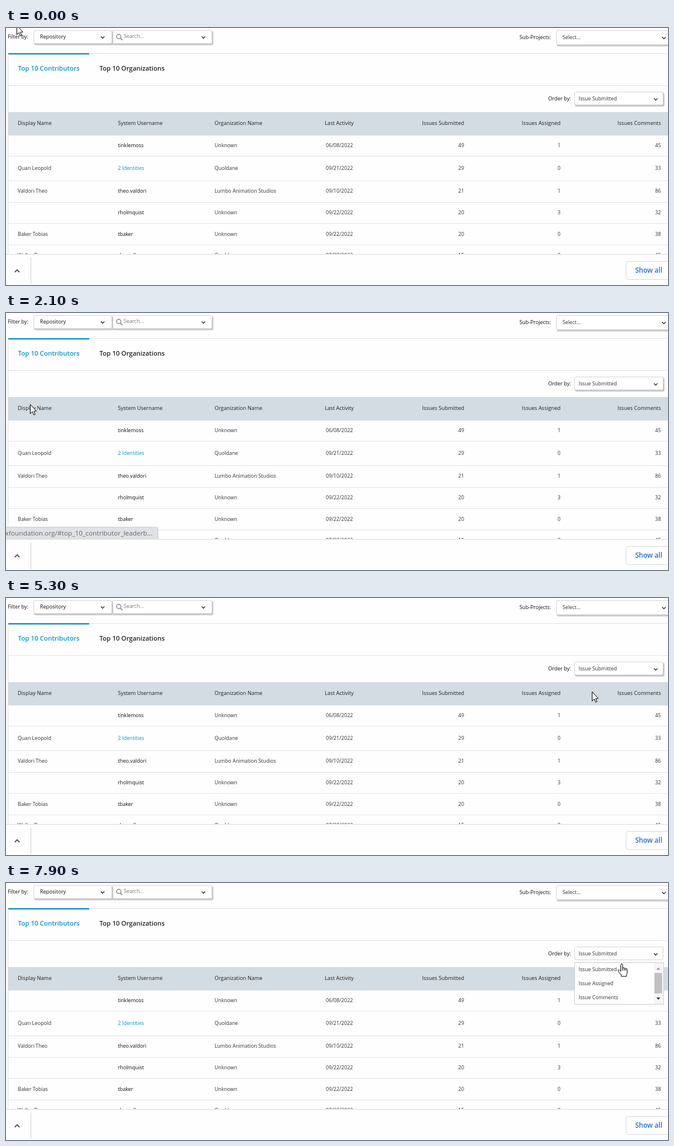
These frames come from a looping animation (1130x440 px, 8 s). An HTML page:

```html
<!DOCTYPE html>
<html lang="en">
<head>
<meta charset="utf-8">
<title>Leaderboard</title>
<style>
html, body { margin: 0; width: 100%; height: 100%; overflow: hidden; background: #fefefe; }
svg { display: block; width: 1130px; height: 440px; }
text { font-family: "Open Sans", "Noto Sans", sans-serif; font-size: 8.7px; fill: #333; white-space: pre; }
.label { font-size: 8.9px; fill: #111; }
.head { font-size: 9px; fill: #222; }
.user { fill: #111; }
.link { fill: #0e93c4; }
.hint { fill: #777; }
.tab { font-size: 11px; font-weight: 600; fill: #222; }
.on { fill: #0e93c4; }
.all { font-size: 11.6px; font-weight: 600; fill: #2a6bc9; }
.status { font-size: 11.3px; fill: #666a6e; }
.chev { fill: none; stroke: #333; stroke-width: 1.4; }
.cursor { fill: #fff; stroke: #000; stroke-width: 1; stroke-linejoin: round; }
</style>
</head>
<body>
<svg id="stage" viewBox="0 0 1130 440"></svg>
<script>
const NS = "http://www.w3.org/2000/svg";
const stage = document.getElementById("stage");

function add(tag, attrs, parent = stage) {
  const el = document.createElementNS(NS, tag);
  for (const k in attrs) el.setAttribute(k, attrs[k]);
  parent.appendChild(el);
  return el;
}
const rect = (x, y, width, height, fill, more = {}, parent) =>
  add("rect", { x, y, width, height, fill, ...more }, parent);
const path = (d, more, parent) => add("path", { d, ...more }, parent);
function text(str, x, y, cls = "", anchor = "start", parent) {
  add("text", { x, y, class: cls, "text-anchor": anchor }, parent).textContent = str;
}
const chevron = (x, y, s = 3, dir = 1, more = {}) =>
  path(`M${x - s} ${y - dir * s / 2}l${s} ${dir * s}l${s} ${-dir * s}`, { class: "chev", ...more });
function field(x, y, w, h) {
  const shade = rect(x + 1, y + 1.5, w + 1, h + 1, "#c6c9cb", { rx: 3 });
  rect(x + .5, y + .5, w - 1, h - 1, "#fff", { rx: 2.5, stroke: "#d3d5d7" });
  return shade;
}

// Filters
text("Filter by:", 3, 18, "label");
field(180, 4, 172, 23);
field(47, 4, 134, 23);
text("Repository", 58, 18, "label");
chevron(165, 16);
add("circle", { cx: 192.5, cy: 14.5, r: 3.7, fill: "none", stroke: "#888", "stroke-width": 1.4 });
path("M195.3 17.3l3.4 3.4", { stroke: "#888", "stroke-width": 1.7 });
text("Search...", 201, 17, "hint");
chevron(337, 16);
text("Sub-Projects:", 876.5, 19, "label");
field(939, 4, 200, 25);
text("Select...", 950, 19);
chevron(1123, 17);

// Panel and tabs
rect(3, 43, 1127, 1, "#e1e3e5");
rect(3, 43, 1, 345, "#dfe1e3");
rect(4, 43, 138, 2.4, "#0e93c4");
text("Top 10 Contributors", 20.5, 73, "tab on");
text("Top 10 Organizations", 159.5, 73, "tab");
rect(4, 98, 1126, 1, "#e1e3e5");
text("Order by:", 925.5, 124, "label");
const shade = field(970, 109, 152, 23);
text("Issue Submitted", 977.5, 124);
chevron(1109, 122);

// Table
rect(4, 144, 1126, 40, "#d3dce3");
const cols = [[20, "start"], [191, "start"], [356, "start"], [544, "start"],
  [782, "end"], [946.5, "end"], [1118, "end"]];
["Display Name", "System Username", "Organization Name", "Last Activity",
  "Issues Submitted", "Issues Assigned", "Issues Comments"]
  .forEach((s, i) => text(s, cols[i][0], 166, "head", cols[i][1]));

const rows = [
  [204, "|tinklemoss|Unknown|06/08/2022|49|1|45"],
  [243, "Quan Leopold|2 Identities|Quoldane|09/21/2022|29|0|33"],
  [282, "Valdori Theo|theo.valdori|Lumbo Animation Studios|09/10/2022|21|1|86"],
  [319, "|rholmquist|Unknown|09/22/2022|20|3|32"],
  [356, "Baker Tobias|tbaker|Unknown|09/22/2022|20|0|38"],
  [392, "Weller Dag|dagweller|Quoldane|07/28/2022|15|0|45"]
];
for (const [y, line] of rows) {
  line.split("|").forEach((s, i) => {
    const cls = i === 1 ? (s.includes(" ") ? "link" : "user") : "";
    text(s, cols[i][0] + (i === 3 ? 2 : 0), y, cls, cols[i][1]);
  });
}
for (const y of [219, 261, 298, 334, 371]) rect(4, y, 1126, 1, "#e1e3e5");

// Link status bubble
const status = add("g", {});
path("M-1 366.5H256Q259.5 366.5 259.5 370V388H-1Z", { fill: "#dfe1e5", stroke: "#cdd0d4" }, status);
text("xfoundation.org/#top_10_contributor_leaderb...", 250, 381, "status", "end", status);

// Bottom bar
rect(0, 387, 1130, 53, "#fefefe");
rect(0, 387, 1130, 1, "#dcdcdc");
rect(42, 393, 1, 45, "#cfcfcf");
chevron(19, 416, 4, -1, { style: "stroke:#555;stroke-width:1.8" });
rect(1058.5, 399.5, 90, 31, "#fff", { rx: 4, stroke: "#d5d9de" });
text("Show all", 1074, 419, "all");

// Order list
const list = add("g", {});
rect(970.5, 136.5, 152, 71, "#fff", { stroke: "#c9cccf" }, list);
["Issue Submitted", "Issue Assigned", "Issue Comments"]
  .forEach((s, i) => text(s, 977.5, 151 + 24 * i, "", "start", list));
rect(1106, 137, 15, 70, "#f5f5f5", {}, list);
rect(1107, 154, 13, 35, "#c1c1c1", {}, list);
path("M1110 148.5h7l-3.5-4z", { fill: "#a3a3a3" }, list);
path("M1110 196h7l-3.5 4z", { fill: "#444" }, list);

// Pointers, each drawn around its hot spot
const pointer = add("g", {});
const shapes = {
  arrow: path("M.5 .5V16.3L4.1 12.9L6.5 18.5L8.8 17.5L6.5 12H11Z", { class: "cursor" }, pointer),
  hand: path("M-1.5 2.5Q-1.5 .6 0 .6Q1.6 .6 1.6 2.5V8Q1.8 7 3 7Q4.3 7.1 4.4 8.4Q4.7 7.6 5.6 7.7" +
    "Q6.9 7.8 7 9.2Q7.3 8.6 8.1 8.7Q9.4 9 9.4 10.5V15Q9.4 17 8 19V22H-.5V20L-5.8 13.2" +
    "Q-6.7 11.5 -5.6 10.8Q-4.4 10.2 -3.2 11.5L-1.5 13.3ZM1.6 8V12M4.4 8.4V12M7 9.2V12",
    { class: "cursor" }, pointer),
  beam: path("M-3.5 -7.5H-1L0 -6.5L1 -7.5H3.5M0 -6.5V6.5M-3.5 7.5H-1L0 6.5L1 7.5H3.5",
    { fill: "none", stroke: "#fff", "stroke-width": 1.1 }, pointer)
};

// time, x, y, pointer shape from then on
const track = [
  [0, 18, -5, "arrow"], [100, 18, -5, "arrow"], [700, 29, 41, "arrow"], [800, 31, 53, "hand"],
  [900, 33, 60, "hand"], [1000, 33, 62, "hand"], [1300, 97, 68, "hand"], [1400, 97, 68, "hand"],
  [1700, 72, 94, "arrow"], [2100, 41, 156, "arrow"], [2200, 42, 161, "beam"],
  [2300, 43, 162, "beam"], [2400, 57, 162, "beam"], [2500, 57, 162, "beam"],
  [2600, 130, 168, "arrow"], [2700, 212, 164, "beam"], [2900, 212, 164, "beam"],
  [3000, 278, 170, "arrow"], [3200, 403, 173, "arrow"], [3300, 412, 173, "arrow"],
  [3500, 412, 173, "arrow"], [3900, 550, 165, "beam"], [4000, 568, 163, "beam"],
  [4200, 568, 163, "beam"], [4300, 584, 163, "beam"], [4400, 665, 166, "arrow"],
  [4500, 744, 164, "beam"], [4700, 744, 164, "beam"], [4800, 800, 168, "arrow"],
  [5000, 880, 169, "arrow"], [5100, 880, 169, "arrow"], [5500, 1119, 150, "arrow"],
  [5600, 1119, 150, "arrow"], [5900, 1086, 134, "arrow"], [6000, 1078, 130, "hand"],
  [6100, 1073, 128, "hand"], [6300, 1073, 128, "hand"], [6400, 1072, 126, "hand"],
  [6500, 1072, 126, "hand"], [6600, 1071, 125, "hand"], [6800, 1071, 125, "hand"],
  [6900, 1070, 124, "hand"], [7100, 1070, 124, "hand"], [7200, 1069, 124, "hand"],
  [7800, 1069, 124, "hand"], [7900, 1051, 138, "hand"]
];

function statusOpacity(t) {
  if (t === 900) return .35;
  if (t === 2200) return .5;
  return t > 900 && t < 2200 ? 1 : 0;
}

function draw(now) {
  const t = Math.floor(now % 8000 / 100) * 100;
  const i = track.findLastIndex(k => k[0] <= t);
  const a = track[i], b = track[i + 1] || a;
  const u = b === a ? 0 : (t - a[0]) / (b[0] - a[0]);
  const at = n => Math.round(a[n] + (b[n] - a[n]) * u);
  pointer.setAttribute("transform", `translate(${at(1)} ${at(2)})`);
  for (const k in shapes) shapes[k].style.display = k === a[3] ? "" : "none";
  status.style.opacity = statusOpacity(t);
  const open = t >= 7600;
  list.style.display = open ? "" : "none";
  shade.style.display = open ? "none" : "";
}

const start = performance.now();
function tick() {
  draw(performance.now() - start);
  requestAnimationFrame(tick);
}
tick();
</script>
</body>
</html>
```
